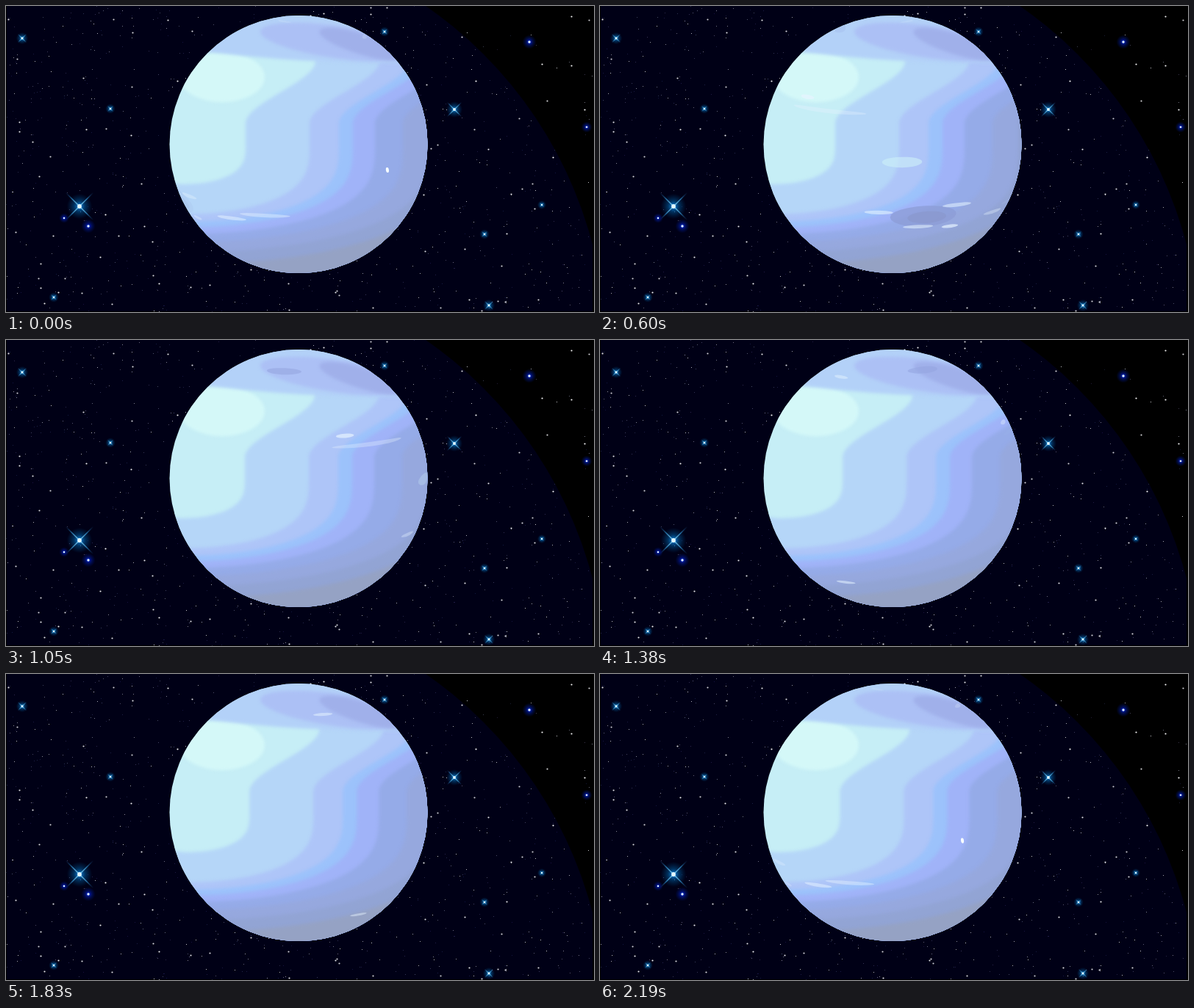
Write an HTML page with a canvas that moves like this. It is 800x417 px and loops after 2.22 s.

```html
<!DOCTYPE html>
<html lang="en">
<head>
<meta charset="utf-8">
<title>Rotating planet</title>
<style>
  html, body { margin: 0; width: 100%; height: 100%; overflow: hidden; background: #000; }
  canvas { display: block; width: 800px; height: 417px; }
</style>
</head>
<body>
<canvas id="stage" width="800" height="417"></canvas>
<script>
const W = 800, H = 417, LOOP = 2220, STEP = 30;
const CX = 398, CY = 188.6, R = 175.5;
const RAD = Math.PI / 180;
const TILT_S = Math.sin(10 * RAD), TILT_C = Math.cos(10 * RAD);
const ctx = document.getElementById('stage').getContext('2d');

function seeded(seed) {
  return () => {
    seed = (seed * 1664525 + 1013904223) >>> 0;
    return seed / 4294967296;
  };
}

function disc(g, x, y, r) {
  g.beginPath();
  g.arc(x, y, r, 0, 7);
}

// ---------- sky ----------
const halo = { x: 245.5, y: 469, r: 571 };

// x, y, size; a negative size is a deep blue star without rays
const brightStars = [
  [100, 273, 19], [610, 141, 10], [22, 44, 6], [657, 408, 6], [65, 397, 4],
  [651, 311, 4], [515, 35, 4], [142, 140, 4], [729, 271, 3],
  [712, 49, -8], [112, 300, -8], [790, 165, -5], [79, 289, -4]
];

function drawStar(g, [x, y, size]) {
  const rays = size > 0, s = Math.abs(size), glow = s * .7 + 4, hue = rays ? 205 : 230;
  const light = g.createRadialGradient(x, y, 0, x, y, glow);
  light.addColorStop(0, `hsla(${hue},100%,50%,.95)`);
  light.addColorStop(.45, `hsla(${hue},100%,32%,.5)`);
  light.addColorStop(1, `hsla(${hue},100%,25%,0)`);
  g.fillStyle = light;
  disc(g, x, y, glow);
  g.fill();
  if (rays) {
    const beam = g.createRadialGradient(x, y, 0, x, y, s * 1.4);
    beam.addColorStop(0, '#8fdcff');
    beam.addColorStop(.5, '#2a78ac');
    beam.addColorStop(1, 'rgba(20,60,110,0)');
    g.strokeStyle = beam;
    g.lineWidth = 1 + s / 40;
    for (const d of [-s, s]) {
      g.beginPath();
      g.moveTo(x - s, y - d);
      g.lineTo(x + s, y + d);
      g.stroke();
    }
  }
  g.fillStyle = '#e4f8ff';
  disc(g, x, y, .8 + s / 9);
  g.fill();
}

function makeSky() {
  const sky = document.createElement('canvas');
  sky.width = W; sky.height = H;
  const g = sky.getContext('2d'), rnd = seeded(41);
  g.fillRect(0, 0, W, H);
  g.save();
  g.beginPath();
  g.rect(1, 0, W - 3, H - 1);
  g.clip();
  g.fillStyle = '#000016';
  disc(g, halo.x, halo.y, halo.r);
  g.fill();
  g.restore();
  for (let i = 0; i < 1150; i++) {
    const x = Math.floor(rnd() * W), y = Math.floor(rnd() * H);
    const power = rnd(), tint = rnd(), keep = rnd();
    const inside = Math.hypot(x - halo.x, y - halo.y) < halo.r;
    if (!inside && keep > .3) continue;
    g.globalAlpha = .2 + .8 * power * power;
    g.fillStyle = `hsl(${225 + 30 * tint},${80 - 70 * power}%,${62 + 35 * power}%)`;
    if (power > .9) {
      disc(g, x + .5, y + .5, 1.1);
      g.fill();
    } else g.fillRect(x, y, 1, 1);
  }
  g.globalAlpha = 1;
  brightStars.forEach(s => drawStar(g, s));
  return sky;
}
const sky = makeSky();

// ---------- fixed light on the disc ----------
// colour, edge on the equator, height where the edge meets the left limb
const shades = [
  ['#b5d6f8', 326, 243],
  ['#aec5f8', 413, 284],
  ['#9cc2fb', 453, 294],
  ['#a0b3f8', 472, 302],
  ['#95abe8', 502, 311],
  ['#96a8de', 540, 322],
  ['#92a4d4', 575, 336],
  ['#95a2c4', 600, 352]
];

function edgeX(y, mid, end) {
  const k = Math.min(1, Math.max(0, (160 - y) / 85));
  const shoulder = 95 * k * k * (3 - 2 * k);
  const u = Math.max(0, (y - 190) / (end - 190));
  return 240 + (mid - 240) * Math.sqrt(1 - u ** 3) + shoulder;
}

function shade([color, mid, end], dx) {
  ctx.beginPath();
  ctx.moveTo(600, 50);
  for (let y = 50; y <= end; y++) ctx.lineTo(edgeX(y, mid, end) + dx, y);
  ctx.lineTo(190, end - 6);
  ctx.lineTo(190, 400);
  ctx.lineTo(600, 400);
  ctx.fillStyle = color;
  ctx.fill();
}

function oval(color, x, y, rx, ry, turn = 0) {
  ctx.beginPath();
  ctx.ellipse(x, y, rx, ry, turn, 0, 7);
  ctx.fillStyle = color;
  ctx.fill();
}

function drawLight(t) {
  const dx = -6 * Math.sin(2 * Math.PI * t / LOOP);
  ctx.filter = 'blur(2px)';
  ctx.fillStyle = '#c6eef6';
  ctx.fillRect(CX - R - 9, CY - R - 9, R * 2 + 18, R * 2 + 18);
  oval('#d4f8f8', 294, 97, 58, 34);
  shades.forEach(s => shade(s, dx));
  // northern cap
  ctx.beginPath();
  ctx.moveTo(190, 0);
  ctx.lineTo(190, 50);
  ctx.quadraticCurveTo(390, 84, 600, 76);
  ctx.lineTo(600, 0);
  ctx.fillStyle = '#b3d1f8';
  ctx.fill();
  oval('#acc0f5', 450, 49, 105, 22, .14);
  oval('#a0b0ea', 484, 52, 60, 14, .3);
}

// ---------- clouds turning with the globe ----------
function project(lon, lat) {
  const c = Math.cos(lat * RAD), s = Math.sin(lat * RAD), l = lon * RAD;
  let x = c * Math.sin(l), y = s * TILT_C - c * Math.cos(l) * TILT_S;
  const z = s * TILT_S + c * Math.cos(l) * TILT_C;
  if (z < 0) {
    const d = Math.hypot(x, y);
    x /= d; y /= d;
  }
  return [CX + R * x, CY - R * y, z];
}

function cloud(lon, lat, w, h, color, alpha) {
  const z = project(lon, lat)[2];
  if (z < 0) return;
  ctx.beginPath();
  for (let a = 0; a < 360; a += 15)
    ctx.lineTo(...project(lon + w * Math.cos(a * RAD), lat + h * Math.sin(a * RAD)).slice(0, 2));
  ctx.fillStyle = color;
  ctx.globalAlpha = alpha * Math.min(1, z * 2);
  ctx.fill();
  ctx.globalAlpha = 1;
}

// longitude, latitude, half width in degrees
const wisps = [
  [-84, -30, 8], [-65, -19.6, 8], [-66, -31, 5], [-104, -22, 7],
  [-17, -24, 13], [-36, -27, 9], [-146, 28.5, 5], [-132, 23.5, 22],
  [-255, -45.5, 7], [-275, 59, 9], [-48, 81, 28]
];

function drawClouds(turn) {
  ctx.filter = 'blur(.6px)';
  cloud(turn - 81.5, -24.5, 17, 5.6, '#8c9cd6', .75);
  cloud(turn - 80, -25, 10, 3.2, '#8894c8', .5);
  cloud(turn - 187, 66, 20, 2.6, '#94a6e0', .6);
  cloud(turn - 93, 2, 9, 2.4, '#cdf1f8', .6);
  for (const [lon, lat, w] of wisps)
    cloud(turn + lon, lat, w, 1, '#e6f4ff', 1.1 / Math.sqrt(Math.max(2, w / 2)));
}

// small bright body crossing faster than the clouds
function drawTransit(frame) {
  const n = frame > 37 ? frame - 74 : frame;
  const lon = 43.7 + 10.8 * n;
  if (Math.abs(lon) > 88) return;
  const [x, y] = project(lon, -4.3);
  oval('#f8ffff', x, y, 2, 3.6, -.15);
}

function draw(t) {
  ctx.drawImage(sky, 0, 0);
  ctx.save();
  disc(ctx, CX, CY, R);
  ctx.clip();
  drawLight(t);
  drawClouds(360 * t / LOOP);
  ctx.filter = 'none';
  drawTransit(t / STEP);
  ctx.restore();
}

const start = performance.now();
let shown = -1;
function tick() {
  const t = Math.floor((performance.now() - start) % LOOP / STEP) * STEP;
  if (t !== shown) draw(shown = t);
  requestAnimationFrame(tick);
}
tick();
</script>
</body>
</html>
```
